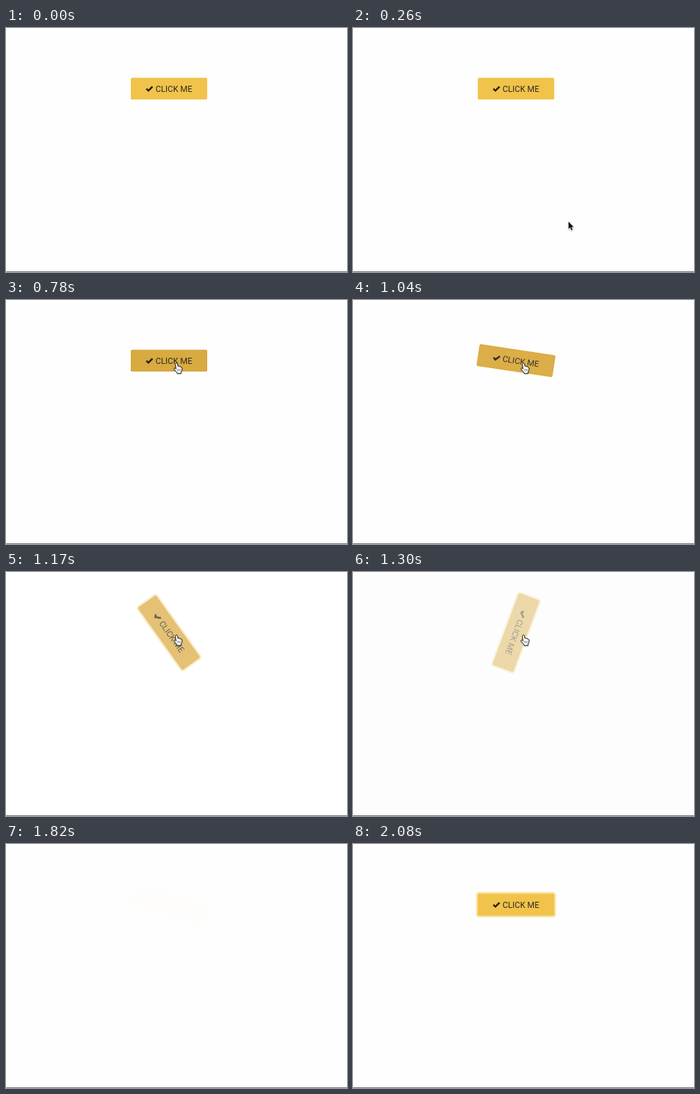
These frames come from a looping animation (500 by 359 pixels, 2470 ms). An HTML page with a canvas:

```html
<!DOCTYPE html>
<html lang="en">
<head>
<meta charset="utf-8">
<title>Rotating button</title>
<style>
  html, body { margin: 0; width: 100%; height: 100%; overflow: hidden; background: #fefefe; }
  canvas { display: block; width: 500px; height: 359px; }
</style>
</head>
<body>
<canvas id="stage" width="500" height="359"></canvas>
<script>
const ctx = document.getElementById('stage').getContext('2d');
const W = 500, H = 359, LOOP = 2470, STEP = 130;
const PAPER = '#fefefe';
const CENTER = { x: 239, y: 89.2 };
const SPIN_START = 980, SPIN_TIME = 1000, SPIN_ANGLE = 200, RESET = 2080;

// Pointer path: time, x, y
const TRACK = [
  [0, 345, 385], [130, 332, 352], [260, 316, 285], [390, 293, 197],
  [520, 269.5, 130], [650, 251.5, 98], [780, 249, 93], [1300, 249, 93],
  [1430, 253, 165], [1560, 259, 276.5], [1690, 264, 350], [1820, 268, 390]
];
const ARROW = new Path2D('M0 0V10.6L2.4 8.4L4.1 12.4L6 11.6L4.3 7.7H7.6Z');
const HAND = new Path2D('M0 .2C1 -.8 2.2 -.2 2.3 1L3 4.6C4 4 5 4.3 5.3 5.2' +
  'C6.2 4.7 7 5 7.2 6C8.2 5.7 9 6.3 9 7.4C9 10 8.6 11.5 7.6 13V15H2L1.6 13.6' +
  'C0 12 -1.5 10 -2.6 8.6C-3 7.6 -1.8 6.8 -.8 7.6L.4 8.6L-.6 1.6C-.7 1 -.5 .5 0 .2Z');

const clamp = v => Math.max(0, Math.min(1, v));
const mix = (a, b, k) => a + (b - a) * k;
const ramp = (t, start, time) => clamp((t - start) / time);
const blend = (a, b, k) => `rgb(${a.map((v, i) => Math.round(mix(v, b[i], k))).join(',')})`;

// CSS "ease": cubic-bezier(.25, .1, .25, 1)
function ease(x) {
  const curve = (a, b, u) => 3 * a * u * (1 - u) ** 2 + 3 * b * u * u * (1 - u) + u ** 3;
  let lo = 0, hi = 1;
  for (let i = 0; i < 24; i++) {
    const mid = (lo + hi) / 2;
    if (curve(.25, .25, mid) < x) lo = mid; else hi = mid;
  }
  return curve(.1, 1, lo);
}

function pointerAt(t) {
  const i = TRACK.findIndex(p => p[0] > t);
  if (i < 1) return null;
  const [a, b] = [TRACK[i - 1], TRACK[i]];
  const k = (t - a[0]) / (b[0] - a[0]);
  return { x: mix(a[1], b[1], k), y: mix(a[2], b[2], k) };
}

function box(grow, radius, color) {
  ctx.beginPath();
  ctx.roundRect(-56 - grow, -16 - grow, 112 + 2 * grow, 32 + 2 * grow, radius);
  ctx.fillStyle = color;
  ctx.fill();
}

function drawButton(t) {
  const spin = t < RESET ? ease(ramp(t, SPIN_START, SPIN_TIME)) : 0;
  const hover = ramp(t, 600, 150) - ramp(t, 1380, 150);
  const ring = 2.5 * ramp(t, 1000, 150);

  ctx.save();
  ctx.translate(CENTER.x, CENTER.y);
  ctx.rotate(spin * SPIN_ANGLE * Math.PI / 180);
  if (ring > 0) box(ring, 2 + ring, '#f8e1a0');
  box(0, 2, blend([240, 194, 72], [207, 158, 54], hover));
  box(-.8, 1.5, blend([241, 195, 74], [217, 170, 64], hover));

  ctx.strokeStyle = '#26231c';
  ctx.lineWidth = 2.6;
  ctx.beginPath();
  ctx.moveTo(-33.2, .2);
  ctx.lineTo(-30.2, 3);
  ctx.lineTo(-24.2, -2.9);
  ctx.stroke();

  ctx.font = '12.2px Roboto, sans-serif';
  ctx.fillStyle = '#2d2a22';
  ctx.fillText('CLICK ME', -19.8, 4.4);
  ctx.restore();

  // Fade into the paper as one piece
  ctx.globalAlpha = spin;
  ctx.fillStyle = PAPER;
  ctx.fillRect(0, 0, W, H);
  ctx.globalAlpha = 1;
}

function drawPointer(t) {
  const p = pointerAt(t);
  if (!p) return;
  const isHand = t >= 650 && t < 1430;
  const shape = isHand ? HAND : ARROW;
  ctx.save();
  ctx.translate(p.x, p.y);
  ctx.lineJoin = 'round';
  ctx.shadowColor = 'rgba(0,0,0,.3)';
  ctx.shadowBlur = 2;
  ctx.shadowOffsetY = 1;
  ctx.lineWidth = isHand ? 1 : 1.6;
  ctx.strokeStyle = isHand ? '#222' : '#fff';
  ctx.stroke(shape);
  ctx.shadowColor = 'transparent';
  ctx.fillStyle = isHand ? '#fff' : '#111';
  ctx.fill(shape);
  if (isHand) {
    ctx.lineWidth = .9;
    ctx.stroke(shape);
    ctx.lineWidth = .6;
    ctx.beginPath();
    for (const x of [2.6, 4.5, 6.4]) {
      ctx.moveTo(x, 8.5);
      ctx.lineTo(x, 11.5);
    }
    ctx.stroke();
  }
  ctx.restore();
}

function draw(now) {
  const t = Math.floor((now % LOOP) / STEP) * STEP;
  ctx.fillStyle = PAPER;
  ctx.fillRect(0, 0, W, H);
  drawButton(t);
  ctx.fillStyle = '#6e6e6e';
  ctx.fillRect(0, H - 1, W, 1);
  drawPointer(t);
}

const start = performance.now();
function tick() {
  draw(performance.now() - start);
  requestAnimationFrame(tick);
}
tick();
</script>
</body>
</html>
```
